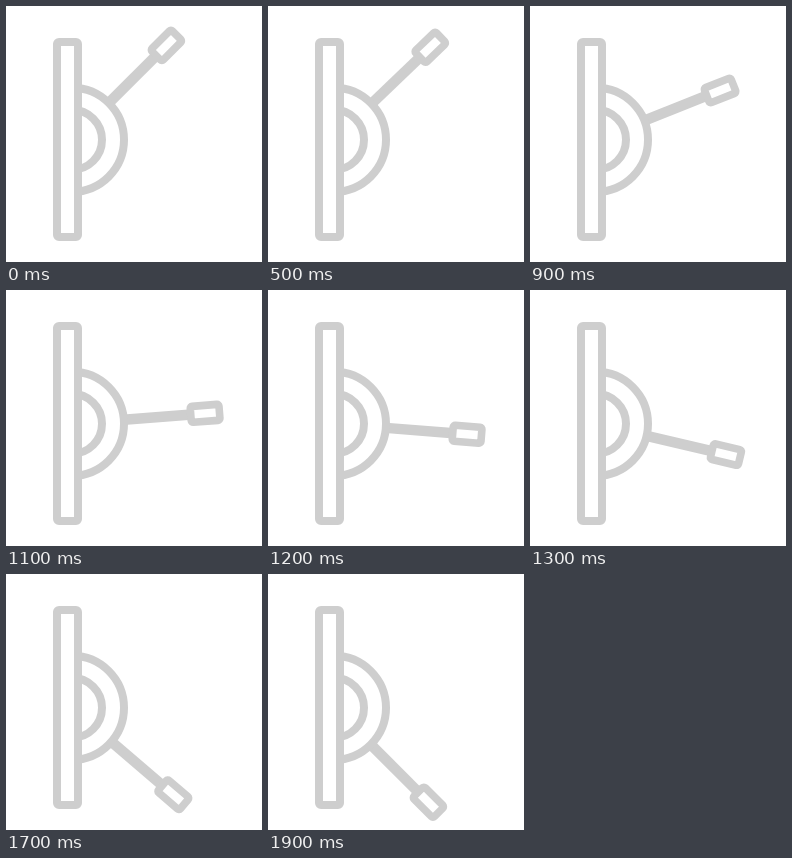
Write an HTML page with a canvas that moves like this. It is 256 px wide and 256 px high and loops after 2400 ms.

```html
<!DOCTYPE html>
<html lang="en">
<head>
<meta charset="utf-8">
<title>Lever switch</title>
<style>
  html, body { margin: 0; width: 100%; height: 100%; overflow: hidden; background: #fff; }
  canvas { display: block; width: 100vw; height: 100vh; }
</style>
</head>
<body>
<canvas id="stage" width="256" height="256"></canvas>
<script>
  const canvas = document.getElementById('stage');
  const ctx = canvas.getContext('2d');
  const LOOP = 2400, HOLD = 500, STEP = 100, STEPS = 15;
  const SWING = Math.PI / 4;
  const PIVOT = { x: 66, y: 133.8 };
  const GREY = '#cecece';

  function leverAngle(time) {
    const step = Math.floor((time - HOLD) / STEP) + 1;
    const p = Math.min(STEPS, Math.max(0, step)) / STEPS;
    const eased = p * p * (3 - 2 * p);
    return SWING * (2 * eased - 1);
  }

  function box(x, y, w, h, line) {
    ctx.lineWidth = line;
    ctx.beginPath();
    ctx.roundRect(x, y, w, h, 2);
    ctx.fill();
    ctx.stroke();
  }

  function halfRing(radius) {
    ctx.lineWidth = 8;
    ctx.beginPath();
    ctx.arc(PIVOT.x, PIVOT.y, radius, -Math.PI / 2, Math.PI / 2);
    ctx.stroke();
  }

  function drawLever(angle) {
    ctx.save();
    ctx.translate(PIVOT.x, PIVOT.y);
    ctx.rotate(angle);
    ctx.lineWidth = 10.5;
    ctx.beginPath();
    ctx.moveTo(52, 0);
    ctx.lineTo(120, 0);
    ctx.stroke();
    box(119.1, -8, 28.8, 16, 7.6);
    ctx.restore();
  }

  function draw(time) {
    const scale = Math.min(innerWidth, innerHeight) / 256 * (window.devicePixelRatio || 1);
    const size = Math.round(256 * scale) || 256;
    if (canvas.width !== size) canvas.width = canvas.height = size;
    ctx.setTransform(size / 256, 0, 0, size / 256, 0, 0);
    ctx.fillStyle = '#fff';
    ctx.fillRect(0, 0, 256, 256);
    ctx.strokeStyle = GREY;
    drawLever(leverAngle(time));
    halfRing(52);
    halfRing(30);
    box(51, 36, 21, 195, 8);
  }

  const start = performance.now();
  function tick() {
    draw((performance.now() - start) % LOOP);
    requestAnimationFrame(tick);
  }
  tick();
</script>
</body>
</html>
```
